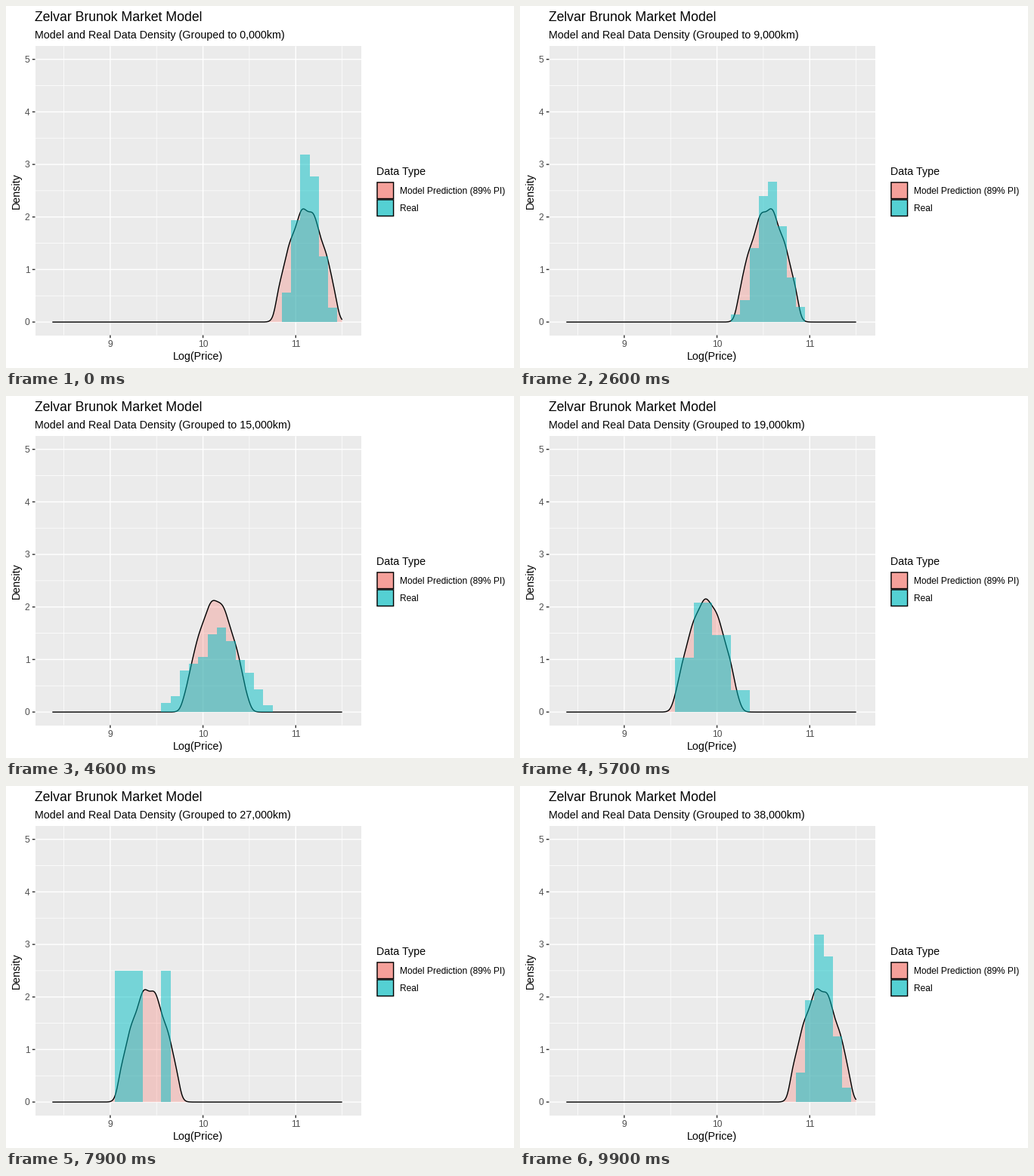
These frames come from a looping animation (672x480 px, 10 s). A matplotlib script:

```python
import matplotlib.pyplot as plt
import numpy as np
from matplotlib.animation import FuncAnimation
from matplotlib.patches import Polygon, Rectangle

plt.rcParams["font.family"] = "Liberation Sans"

W, H, DPI = 672, 480, 96
LEFT, RIGHT, TOP, BOTTOM = 38.5, 470.4, 53.3, 436.5
SALMON, TEAL = "#F8766D", "#00BFC4"
LINE = 1.067
BIG, MEDIUM, SMALL = 13.2, 10.7, 9

N_FRAMES = 100
LABELS = [*range(34), 35, 38]
GRID = np.linspace(8.376, 11.5, 512)
BINS = np.arange(84, 116) / 10


def px(v):
    return LEFT + (np.asarray(v) - 8.19) / 3.52 * (RIGHT - LEFT)


def py(v):
    return BOTTOM - (np.asarray(v) + 0.25) / 5.5 * (BOTTOM - TOP)


def bell(x, mid, sd):
    return np.exp(-0.5 * ((x - mid) / sd) ** 2) / (sd * np.sqrt(2 * np.pi))


def centre(label):
    return 11.115 - 0.063 * label


def density(label, rng):
    """Normal cut softly to its 89% interval, with a slight ripple."""
    d = GRID - centre(label)
    edge = (1 + np.tanh((0.336 - np.abs(d)) / 0.047)) / 2
    ripple = 1 + 0.02 * np.sin(2 * np.pi * (d / 0.14 + rng.random()))
    return 1.01 * bell(d, 0, 0.21) / 0.89 * edge * ripple


def histogram(label, rng):
    """Noisy bell of counts that thins out to a few bars."""
    mid = centre(label) + 0.02
    sd = np.interp(label, [0, 5, 9, 16, 23], [0.12, 0.21, 0.16, 0.26, 0.2])
    n = 66 / (1 + np.exp((label - 15.5) / 2.5))
    shape = bell(BINS, mid, sd)
    counts = np.round(n * 0.1 * shape * rng.uniform(0.75, 1.25, len(BINS)))
    if n < 9:
        bars = rng.choice(len(BINS), 4, replace=False, p=shape / shape.sum())
        counts[:] = 0
        counts[bars] = rng.integers(1, 3, 4)
    if label % 6 == 0 and 10 < label < 30:
        counts[np.argmin(np.abs(BINS - mid + 1))] += 1  # a cheap outlier
    return counts * 10 / counts.sum()


def make_state(label):
    rng = np.random.default_rng(label)
    return density(label, rng), histogram(label, rng)


STATES = [make_state(label) for label in LABELS]
# Three frames per state, two near the end
ARRIVE = [0] + [3 * k - 1 - (k >= 20) - max(0, k - 30)
                for k in range(1, len(LABELS))]


def pose(frame):
    """Label, density and bar heights shown at a frame."""
    if frame == N_FRAMES - 1:
        return LABELS[-1], *STATES[0]
    k = sum(a <= frame for a in ARRIVE) - 1
    dens, bars = STATES[k]
    if frame + 1 in ARRIVE:
        next_dens, next_bars = STATES[k + 1]
        dens, bars = (dens + next_dens) / 2, (bars + next_bars) / 2
    return LABELS[k], dens, bars


fig = plt.figure(figsize=(W / DPI, H / DPI), dpi=DPI, facecolor="white")
ax = fig.add_axes([0, 0, 1, 1])
ax.set(xlim=(0, W), ylim=(H, 0))
ax.axis("off")


def text(x, y, s, size=MEDIUM, color="black", **kw):
    return ax.text(x, y, s, fontsize=size, color=color, va="baseline", **kw)


def line(xs, ys, color, width, z):
    return ax.plot(xs, ys, color=color, lw=width, zorder=z, snap=False,
                   solid_capstyle="butt")[0]


def grid_x(v, width, z):
    line([px(v)] * 2, [TOP, BOTTOM], "white", width, z)


def grid_y(v, width, z):
    line([LEFT, RIGHT], [py(v)] * 2, "white", width, z)


# Panel, grid and axes
ax.add_patch(Rectangle((LEFT, TOP), RIGHT - LEFT, BOTTOM - TOP,
                       fc="#EBEBEB", lw=0, zorder=0))
for v in np.arange(8.5, 12):
    grid_x(v, LINE / 2, 1)
for v in np.arange(0.5, 5):
    grid_y(v, LINE / 2, 1)
for v in (9, 10, 11):
    grid_x(v, LINE, 2)
    line([px(v)] * 2, [BOTTOM, BOTTOM + 3.67], "#333333", LINE, 2)
    text(px(v), 452, str(v), SMALL, "#4D4D4D", ha="center")
for v in range(6):
    grid_y(v, LINE, 2)
    line([LEFT - 3.67, LEFT], [py(v)] * 2, "#333333", LINE, 2)
    text(31.6, py(v) + 4.2, str(v), SMALL, "#4D4D4D", ha="right")

text(38, 20, "Zelvar Brunok Market Model", BIG)
subtitle = text(38, 43, "")
text((LEFT + RIGHT) / 2, 469, "Log(Price)", ha="center")
text(17.5, (TOP + BOTTOM) / 2, "Density", ha="center", rotation=90,
     rotation_mode="anchor")

# Legend
text(490, 224, "Data Type")
for y, color, name in ((233.2, SALMON, "Model Prediction (89% PI)"),
                       (256.2, TEAL, "Real")):
    ax.add_patch(Rectangle((490.3, y), 23, 23, fc="#F2F2F2", lw=0))
    inner = (491, y + 0.7), 21.6, 21.6
    for alpha in (0.3, 0.5):
        ax.add_patch(Rectangle(*inner, fc=color, alpha=alpha, lw=0))
    ax.add_patch(Rectangle(*inner, fc="none", ec="black", lw=LINE,
                           snap=False))
    text(521, y + 15.6, name, SMALL)

area = ax.add_patch(Polygon([(0, 0)], fc=SALMON, alpha=0.3, lw=0, zorder=3))
outline = line([], [], "black", LINE, 4)
bars_shape = ax.add_patch(Polygon([(0, 0)], fc=TEAL, alpha=0.5, lw=0,
                                  zorder=5, antialiased=False))

GX = px(GRID)
BAR_X = np.repeat(px(np.append(BINS, BINS[-1] + 0.1) - 0.05), 2)


def draw(frame):
    label, dens, bars = pose(frame)
    subtitle.set_text(
        f"Model and Real Data Density (Grouped to {label},000km)")
    y = py(dens)
    area.set_xy(np.column_stack([np.r_[GX[0], GX, GX[-1]],
                                 np.r_[py(0), y, py(0)]]))
    outline.set_data(GX, y)
    tops = np.r_[0, np.repeat(bars, 2), 0]
    bars_shape.set_xy(np.column_stack([BAR_X, py(tops)]))
    return subtitle, area, outline, bars_shape


anim = FuncAnimation(fig, draw, frames=N_FRAMES, interval=100,
                     init_func=lambda: draw(0), repeat=True, repeat_delay=0)
plt.show()
```
